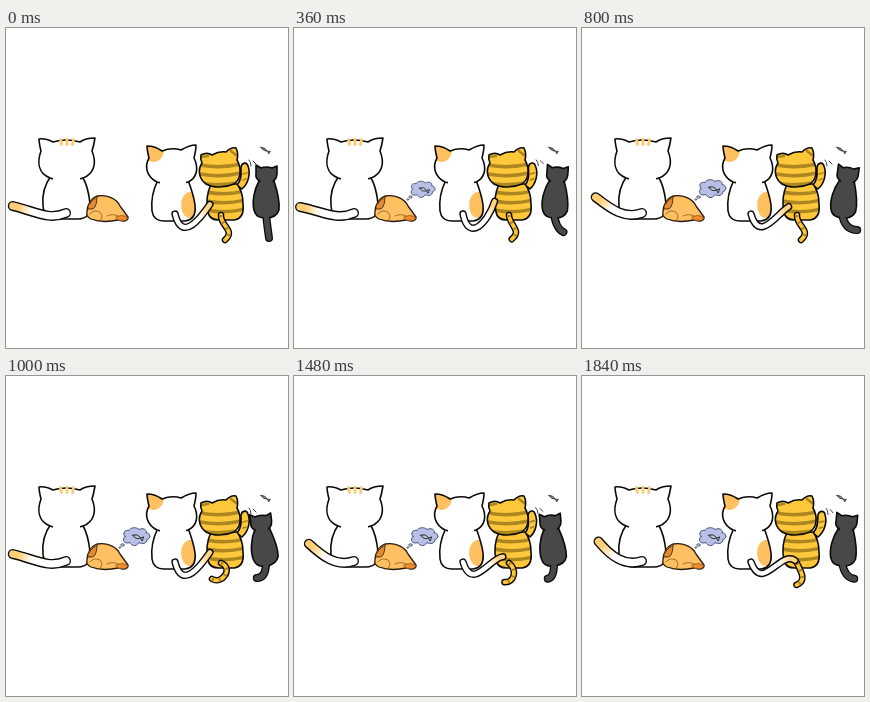
An HTML page with a canvas that plays this animation: 282 by 320 pixels, repeating every 2000 ms.

```html
<!DOCTYPE html>
<html lang="en">
<head>
<meta charset="utf-8">
<title>Cats in a row</title>
<style>
html, body { margin: 0; width: 100%; height: 100%; overflow: hidden; background: #fff; }
canvas { display: block; width: 282px; height: 320px; }
</style>
</head>
<body>
<canvas id="stage"></canvas>
<script>
const W = 282, H = 320, LOOP = 2000, STEP = 40, LAST = 1840;
const SLOW = LOOP / 5, FAST = LOOP / 6, SLOW_END = 1680;
const INK = '#0b0a08', GOLD = '#ffc83a', BROWN = '#ad861f', PEACH = '#ffc061', COAL = '#484848';
const canvas = document.getElementById('stage');
const ratio = window.devicePixelRatio || 1;
canvas.width = W * ratio;
canvas.height = H * ratio;
const g = canvas.getContext('2d');
g.lineCap = g.lineJoin = 'round';

// Swings between -1 and 1, reaching 1 at the time peak.
const swing = (t, period, peak) => Math.cos(2 * Math.PI * (t - peak) / period);
const mix = (a, b, s) => a.map((v, i) => v + (b[i] - v) * (s + 1) / 2);

function shape(d, fill, line = INK, width = 1.6) {
  const p = new Path2D(d);
  if (fill) { g.fillStyle = fill; g.fill(p); }
  if (line) { g.strokeStyle = line; g.lineWidth = width; g.stroke(p); }
}
const stroke = (d, color, width) => shape(d, null, color, width);

function oval(x, y, rx, ry, fill, line, width = 1) {
  g.beginPath();
  g.ellipse(x, y, rx, ry, 0, 0, 2 * Math.PI);
  g.fillStyle = fill;
  g.fill();
  if (line) { g.strokeStyle = line; g.lineWidth = width; g.stroke(); }
}

// Fills a shape, paints its markings inside it, then outlines it.
function marked(d, fill, paint) {
  shape(d, fill, null);
  g.save();
  g.clip(new Path2D(d));
  paint();
  g.restore();
  stroke(d, INK, 1.6);
}

function turned(x, y, degrees, paint) {
  g.save();
  g.translate(x, y);
  g.rotate(degrees * Math.PI / 180);
  g.translate(-x, -y);
  paint();
  g.restore();
}

// A pose holds two control points and the tip.
function tail(x, y, pose, width, color) {
  const d = `M${x} ${y}C${pose}`;
  stroke(d, INK, width);
  stroke(d, color, width - 2.8);
  return d;
}

function tipColor(pose, tip, reach) {
  const [, , , , x, y] = pose;
  const c = g.createRadialGradient(x, y, 0, x, y, reach);
  c.addColorStop(.3, tip);
  c.addColorStop(1, '#fff');
  return c;
}

function whiteCat(t) {
  shape('M45 148C39 156 36 167 37 178C38 188 43 191 52 191H72C81 191 85 185 84 176C83 165 81 156 76 148Z', '#fff');
  shape('M33 111C38 110 43 112 47 114Q60 110 74 114C78 111 83 110 89 110C88 116 87 120 86 123C91 135 88 146 77 150C66 154 54 154 44 150C32 145 31 134 35 123C34 119 33 115 33 111Z', '#fff');
  g.fillStyle = '#fff';
  g.fillRect(47, 147, 27, 7);
  for (const i of [-1, 0, 1])
    stroke(`M${61 + i * 6.5} 111.5L${61 + i * 5.5} 116.5`, '#ffcb6b', 2.8);
  const pose = mix([42, 193, 28, 183, 6, 179], [42, 191, 28, 179, 17, 165], swing(t, FAST, 195));
  tail(60, 185, pose, 10, tipColor(pose, '#ffcf77', 20));
}

function sleeper() {
  shape('M81 184C81 177 85 170 91 168C101 166 111 171 114 178L122 189C123 193 117 194 112 192C103 194 93 194 85 191C81 189 80 187 81 184Z', PEACH, '#2b1a0c', 1.3);
  shape('M91 169Q85 172 82 178L82 181L87 181Q91 178 91 169Z', '#e08b35', '#4b270e', .9);
  shape('M110 189Q116 186 121 189Q123 194 112 192Z', '#f08c2c', '#8a4a18', .7);
  stroke('M84 186Q88 181 94 184Q98 189 94 192M101 188Q107 185 112 188', '#8a5a22', .8);
}

function smallFish(color) {
  shape('M-5 0Q0 -4 4 0L7 -2.5V2.5L4 0Q0 4 -5 0Z', color, '#2c303a', 1);
  oval(-2.7, -.4, .5, .5, INK);
}

function bubble(t) {
  const u = Math.min(1, Math.max(0, (t - 80) / 400));
  if (!u) return;
  const s = 1 - (1 - u) ** 2;
  const puff = (x, y, r) => oval(x, y, r, r * .75, '#b8bfe6', '#4d5072', .8);
  puff(113.8, 171.5, 1);
  puff(116.5, 169, 1.8 * s);
  g.save();
  g.translate(113, 168.5);
  g.scale(s, s);
  g.translate(-113, -168);
  shape('M119 160C116 156 119 153 123 154C124 151 130 150 133 153C137 151 141 153 140 156C145 157 145 162 141 163C141 167 136 168 133 166C130 171 125 169 124 166C119 168 115 164 119 160Z', '#b8bfe6', '#4d5072', 1);
  g.translate(131, 160.3);
  g.rotate(.35);
  g.scale(.9, .9);
  smallFish('#b9c5d4');
  g.restore();
}

function calico() {
  marked('M152 152C147 162 145 174 146 183C147 190 151 193 158 193H179C187 192 190 186 189 177C188 168 185 160 182 152Z',
    '#fff', () => oval(184, 177, 9, 13, PEACH));
  marked('M141 118C147 118 152 120 156 123Q166 119 175 122C180 119 185 117 190 117C190 122 189 126 188 130C193 140 191 150 182 154C173 157 160 157 151 154C141 149 138 139 143 130C142 126 141 122 141 118Z',
    '#fff', () => oval(147, 122, 11, 12, PEACH));
  g.fillStyle = '#fff';
  g.fillRect(154, 151, 26, 7);
}

function calicoTail(t) {
  const pose = mix([174, 214, 193, 198, 199, 172], [182, 218, 200, 167, 217, 188], swing(t, FAST, 225));
  tail(169, 186, pose, 7.4, tipColor(pose, '#ffd285', 16));
}

function stripes(top, gap, from, to) {
  for (let i = 0; i < 3; i++) {
    const y = top + i * gap;
    stroke(`M${from} ${y}Q${(from + to) / 2} ${y + 4} ${to} ${y - 1}`, BROWN, 3.6);
  }
}

function tabby(t) {
  const wave = 3 * swing(t, SLOW, 100);
  turned(235, 158, wave, () => {
    shape('M231 157C236 152 235 145 235 139C236 134 241 134 242 138C245 146 242 156 236 161Z', GOLD);
    stroke('M237 146L241 145M237 152L240 151', BROWN, 1.8);
    stroke('M243 132Q245 134 245 138M247 133L250 136', '#30302e', .9);
  });
  marked('M205 156C201 165 200 175 202 184C203 190 207 192 213 192H228C235 191 238 185 237 176C237 168 235 161 231 156Z',
    GOLD, () => stripes(164, 9, 200, 239));
  marked('M195 127C199 125 203 125 206 127Q213 123 220 124C223 121 227 119 230 120C232 124 232 128 231 132C236 141 235 151 228 156C219 160 207 160 200 156C192 150 192 141 196 135Q194 131 195 127Z',
    GOLD, () => {
      stripes(137, 9, 194, 235);
      stroke('M196 129L202 128M225 123L230 127', BROWN, 2.6);
    });
  const pose = mix([228, 192, 216, 209, 206, 203], [214, 198, 230, 202, 219, 212], swing(t, SLOW, 0));
  const d = tail(215, 187, pose, 6.6, GOLD);
  g.lineCap = 'butt';
  g.setLineDash([2, 5]);
  stroke(d, BROWN, 3.6);
  g.setLineDash([]);
  g.lineCap = 'round';
}

function blackCat(t) {
  // Starts from rest.
  const s = swing(t, SLOW, 28) * Math.min(1, t / 120);
  const drop = 8 * (1 - Math.abs(s)) ** 2;
  const pose = [261 + s, 197, 262 + 6 * s, 202, 263 + 13.5 * s, 202 + drop];
  tail(260, 186, pose, 8, COAL);
  turned(260, 188, 8 * s, () => {
    shape('M253 153C248 162 246 174 248 182C250 189 254 190 260 190C267 190 271 188 273 182C274 173 271 162 268 153Z', COAL);
    shape('M250 137L255 140Q260 138 266 140L271 138L271 146C271 151 267 155 261 155C254 155 249 151 250 146Z', COAL);
    g.fillStyle = COAL;
    g.fillRect(254.5, 151, 12, 6);
  });
  stroke(`M260 186C${pose}`, COAL, 5.2);
}

function flyingFish() {
  g.save();
  g.translate(258.5, 121.5);
  g.rotate(.55);
  g.scale(.85, .6);
  smallFish('#8c969c');
  g.restore();
}

function draw(t) {
  g.setTransform(ratio, 0, 0, ratio, 0, 0);
  g.fillStyle = '#fff';
  g.fillRect(0, 0, W, H);
  const held = Math.min(t, SLOW_END);
  whiteCat(t);
  sleeper();
  calico();
  bubble(t);
  tabby(held);
  calicoTail(t);
  blackCat(held);
  flyingFish();
}

const start = performance.now();
function tick() {
  const t = (performance.now() - start) % LOOP;
  draw(Math.min(LAST, Math.floor(t / STEP) * STEP));
  requestAnimationFrame(tick);
}
tick();
</script>
</body>
</html>
```
